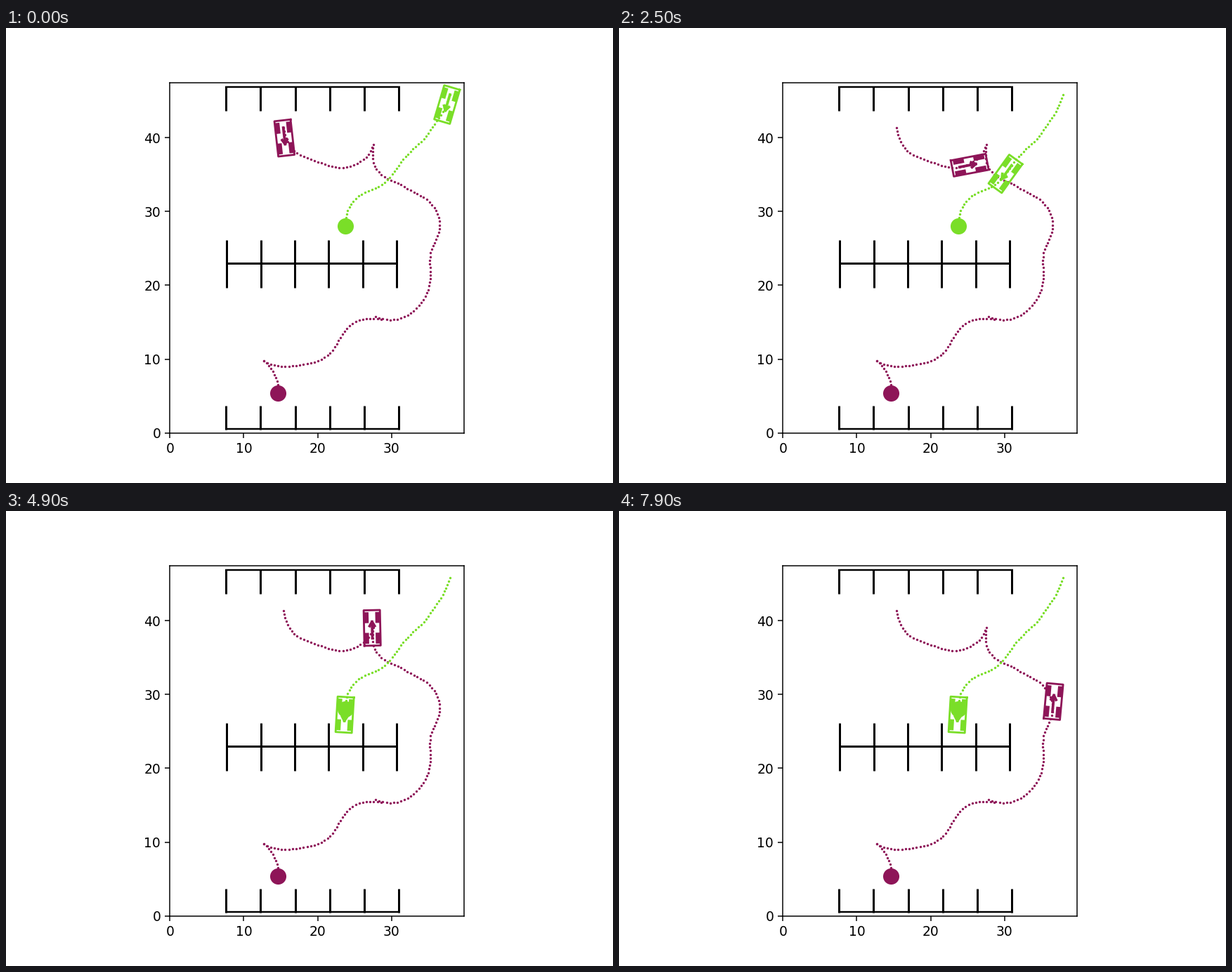
Recreate the animation shown at these times as a matplotlib script. Size 864 by 648 pixels, loop 8 s.

```python
import numpy as np
import matplotlib.pyplot as plt
from matplotlib.animation import FuncAnimation
from matplotlib.patches import Polygon

DPI = 135
XMAX, YMAX = 39.85, 47.45
STEP = 0.5                             # distance driven per tick

PURPLE, GREEN = "#8e1558", "#7ade28"

# car dimensions, measured from the rear axle
REAR, FRONT, WIDTH, WHEELBASE = 1.0, 3.8, 2.2, 2.8
WHEEL_L, WHEEL_W, TRACK = 1.48, 0.62, 1.52
ARROW = 0.8 * WHEELBASE


def drive(keys, gear=1):
    """Poses (x, y, yaw) every STEP along a Hermite curve through key poses.

    Each key is x, y and the direction of travel in degrees.
    """
    keys = np.array(keys, float)
    t = np.linspace(0, 1, 60)[:, None]
    parts = []
    for a, b in zip(keys, keys[1:]):
        p, q = a[:2], b[:2]
        reach = np.hypot(*(q - p))
        u, v = (reach * np.array([np.cos(h), np.sin(h)])
                for h in np.radians([a[2], b[2]]))
        parts.append((1 + 2 * t) * (1 - t)**2 * p + t * (1 - t)**2 * u
                     + t**2 * (3 - 2 * t) * q - t**2 * (1 - t) * v)
    curve = np.vstack([parts[0]] + [part[1:] for part in parts[1:]])
    arc = np.r_[0, np.cumsum(np.hypot(*np.diff(curve, axis=0).T))]
    s = np.linspace(0, arc[-1], round(arc[-1] / STEP) + 1)
    dx, dy = gear * np.gradient(curve, axis=0).T
    yaw = np.unwrap(np.arctan2(dy, dx))
    return np.column_stack([np.interp(s, arc, f) for f in (*curve.T, yaw)])


green_route = drive([(37.91, 45.82, 254), (34.58, 40.06, 234), (32.77, 38.34, 225),
                     (31.17, 36.54, 233), (28.96, 33.82, 219), (26.87, 32.77, 201),
                     (25.05, 31.65, 227), (23.75, 28.65, 267)])

purple_route = np.vstack([
    drive([(15.35, 41.34, -84), (16.68, 38.39, -52), (19.46, 36.91, -19),
           (23.92, 36.01, 11), (27.13, 38.12, 59), (27.58, 39.10, 72)]),
    drive([(27.58, 39.10, -105), (27.41, 37.77, -91), (28.20, 35.39, -48),
           (29.91, 34.25, -19), (32.48, 32.91, -28), (35.53, 30.87, -51),
           (36.50, 27.79, -92), (35.34, 24.63, -106), (35.27, 21.59, -89),
           (34.20, 17.87, -123), (30.77, 15.40, -168), (27.87, 15.73, -202)],
          gear=-1)[1:],
    drive([(28.58, 15.40, 172), (25.82, 15.35, 196), (22.96, 12.73, 242),
           (20.30, 9.88, 201), (15.54, 9.02, 182), (12.73, 9.78, 146)]),
    drive([(12.73, 9.78, -38), (14.58, 6.55, -80)]),
])

fig, ax = plt.subplots(figsize=(864 / DPI, 648 / DPI), dpi=DPI)
ax.set_aspect("equal")
ax.set_xlim(0, XMAX)
ax.set_ylim(0, YMAX)
ax.set_xticks(range(0, 40, 10))
ax.set_yticks(range(0, 50, 10))


def bays(left, pitch, bar, low, high, bar_lw):
    """Five parking bays: one long bar and six dividers."""
    x = left + pitch * np.arange(6)
    ax.plot([x[0] - 0.12, x[-1] + 0.12], [bar, bar], color="black", lw=bar_lw,
            solid_capstyle="butt")
    for divider in x:
        ax.plot([divider, divider], [low, high], color="black", lw=1.6,
                solid_capstyle="butt")


bays(7.6, 4.68, 46.86, 43.66, 46.95, 1.3)
bays(7.72, 4.59, 23.0, 19.66, 26.08, 1.6)
bays(7.6, 4.68, 0.52, 0.43, 3.7, 1.3)


class Car:
    def __init__(self, route, goal, color):
        self.route = route
        ax.plot(route[:, 0], route[:, 1], "o", ms=1.8, mew=0, color=color)
        ax.plot(*goal, "o", ms=12.3, mew=0, color=color)
        self.body, = ax.plot([], [], color=color, lw=1.5)
        self.shaft, = ax.plot([], [], color=color, lw=2)
        self.tip, = ax.plot([], [], color=color, lw=2)
        self.wheels = [ax.add_patch(Polygon(np.zeros((4, 2)), fc=color, lw=0, zorder=2))
                       for _ in range(4)]

    def place(self, step):
        x, y, yaw = self.route[min(step, len(self.route) - 1)]
        c, s = np.cos(yaw), np.sin(yaw)

        def world(pts):
            return np.asarray(pts) @ np.array([[c, s], [-s, c]]) + (x, y)

        w = WIDTH / 2
        self.body.set_data(*world([(-REAR, w), (-REAR, -w), (FRONT, -w),
                                   (FRONT, w), (-REAR, w)]).T)
        self.shaft.set_data(*world([(0, 0), (ARROW, 0)]).T)
        d = 0.3 * ARROW
        back, side = ARROW - d * np.cos(np.pi / 6), d / 2
        self.tip.set_data(*world([(back, side), (ARROW, 0), (back, -side)]).T)
        a, b = WHEEL_L / 2, WHEEL_W / 2
        hubs = [(u, v) for u in (0, WHEELBASE) for v in (-TRACK / 2, TRACK / 2)]
        for wheel, (u, v) in zip(self.wheels, hubs):
            wheel.set_xy(world([(u - a, v - b), (u + a, v - b),
                                (u + a, v + b), (u - a, v + b)]))


purple = Car(purple_route, (14.6, 5.4), PURPLE)
green = Car(green_route, (23.72, 28.0), GREEN)

# (tick, length): purple gives way to green, then halts around its gear change
PAUSES = [(22, 10), (42, 1), (46, 3)]


def draw(frame):
    tick = max(0, frame - 1)
    waited = sum(min(max(tick - start, 0), length) for start, length in PAUSES)
    purple.place(tick - waited)
    green.place(tick)
    return []


anim = FuncAnimation(fig, draw, frames=80, interval=100, repeat=True,
                     init_func=lambda: draw(0))
plt.show()
```
